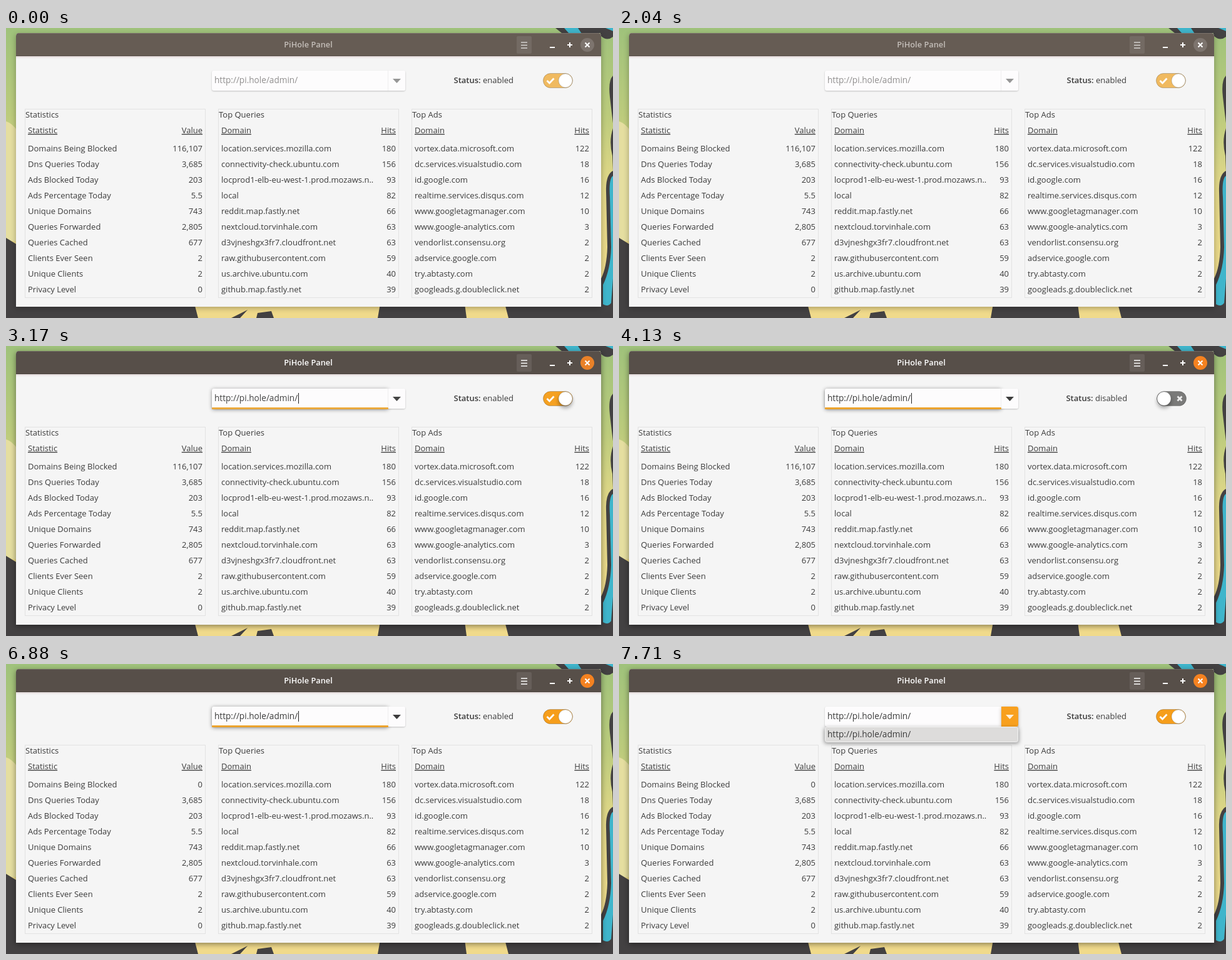
An HTML page for the animation above (8 s loop, 970 px wide and 463 px high).

```html
<!DOCTYPE html>
<html lang="en">
<head>
<meta charset="utf-8">
<title>PiHole Panel</title>
<style>
html, body { margin: 0; width: 100%; height: 100%; overflow: hidden; background: #434142; }
svg { display: block; width: 970px; height: 463px; }
text { font: 13px "Open Sans", "Noto Sans", sans-serif; fill: #3b3b3b; white-space: pre; }
.end { text-anchor: end; }
.mid { text-anchor: middle; }
.bold { font-weight: 600; }
.head { text-decoration: underline; }
.url { font-size: 13.6px; }
.frame { fill: none; stroke: #e2e2e2; }
.line { fill: none; stroke: #fff; stroke-width: 2; }
</style>
</head>
<body>
<svg viewBox="0 0 970 463">
  <defs>
    <linearGradient id="sky" x2="0" y2="1">
      <stop stop-color="#9fc27b"/><stop offset=".3" stop-color="#bccb7c"/>
      <stop offset=".55" stop-color="#e3d889"/><stop offset="1" stop-color="#f0da8b"/>
    </linearGradient>
    <linearGradient id="edge" x2="0" y2="1">
      <stop stop-color="#e2d8d8"/><stop offset="1" stop-color="#f5f5f5"/>
    </linearGradient>
    <filter id="blur" x="-20%" y="-50%" width="140%" height="200%"><feGaussianBlur stdDeviation="3"/></filter>
    <filter id="wide" x="-5%" y="-10%" width="110%" height="120%"><feGaussianBlur stdDeviation="5"/></filter>
    <filter id="soft" x="-10%" y="-30%" width="120%" height="160%"><feGaussianBlur stdDeviation="1.2"/></filter>
  </defs>

  <!-- wallpaper -->
  <rect width="970" height="463" fill="url(#sky)"/>
  <path d="M0 149Q10 152 18 164V340H0Z" fill="#e5dea0"/>
  <path d="M0 335L18 346V440H960V420H970V463H0Z" fill="#434142"/>
  <path d="M301 440H598L594 463H428L424 452 402 455 400 463H374L386 450 360 463H307ZM733 440H797L803 463H736Z" fill="#f0da8b"/>
  <path d="M878 0H970V14Q960 22 950 12V8H888Z" fill="#434142"/>
  <path d="M892 0H914L920 9H900ZM958 0H970V5Z" fill="#3fb5cb"/>
  <path d="M970 76Q962 84 965 110T970 152V160Q963 180 969 204L970 228Q958 234 959 262L961 350Q960 382 951 400V445H970Z" fill="#434142"/>
  <path d="M970 236Q963 240 965 270L967 350Q966 386 954 410V441Q962 446 967 439L970 400Z" fill="#3fb5cb"/>

  <!-- window -->
  <rect id="winShade" x="16" y="11" width="935" height="436" filter="url(#wide)"/>
  <path d="M16 445V13Q16 8 21 8H946Q951 8 951 13V445Z" fill="#f5f5f5"/>
  <path id="bar" d="M16 45V13Q16 8 21 8H946Q951 8 951 13V45Z"/>
  <path d="M20 8.5H947" stroke="#fff" stroke-opacity=".14"/>
  <path d="M16 44.5H951" stroke="#000" stroke-opacity=".14"/>
  <rect x="16" y="45" width="935" height="4" fill="url(#edge)"/>
  <text id="title" class="mid bold" x="483" y="31" style="font-size:12.8px">PiHole Panel</text>
  <rect x="816" y="13" width="24" height="28" rx="2" fill="#fff" fill-opacity=".09"/>
  <path id="menu" class="line" d="M823 23H833M823 27.5H833M823 32H833" style="stroke-width:1.6"/>
  <path class="line" d="M869 31H877M897 27H905M901 23V31"/>
  <circle id="close" cx="929" cy="27" r="11"/>
  <path class="line" d="M925.5 23.5L932.5 30.5M932.5 23.5L925.5 30.5"/>

  <!-- address box -->
  <rect x="329" y="69" width="309" height="32" rx="3" fill-opacity=".22" filter="url(#soft)"/>
  <rect id="entryShade" x="329" y="69" width="282" height="33" rx="3" filter="url(#blur)"/>
  <rect x="329" y="68" width="309" height="32" rx="3" fill="#fdfcfd"/>
  <path d="M610.5 68V100" stroke="#eee"/>
  <rect id="under" x="329" y="98" width="282" height="3" rx="1" fill="#eda32c"/>
  <rect id="dropShade" x="611" y="70" width="27" height="32" rx="3" filter="url(#blur)"/>
  <path d="M611 68H635Q638 68 638 71V97Q638 100 635 100H611Z" fill="#fdfcfd"/>
  <path id="drop" d="M611 68H635Q638 68 638 71V97Q638 100 635 100H611Z" fill="#f8a01e"/>
  <path id="arrow" d="M618 81H631L624.5 88Z"/>
  <text id="url" class="url" x="333" y="88">http://pi.hole/admin/</text>
  <path id="caret" d="M467.5 75V92" stroke="#222"/>

  <!-- status switch -->
  <text class="mid" x="763.3" y="88"><tspan class="bold">Status:</tspan> <tspan id="status"></tspan></text>
  <g id="switch">
    <rect id="track" x=".5" y="72.5" width="47" height="23" rx="11.5" stroke="#000" stroke-opacity=".22"/>
    <path class="line" d="M6.5 84L10.5 88 17.5 80.5" style="stroke-width:2.8"/>
    <path id="cross" class="line" d="M33.5 80.5L40.5 87.5M40.5 80.5L33.5 87.5" style="stroke-width:2.8;stroke:#eee"/>
    <g id="knob">
      <circle id="knobShade" cy="88" r="11" filter="url(#blur)"/>
      <circle cy="84" r="11" fill="#fff" stroke="#000" stroke-opacity=".2"/>
    </g>
  </g>

  <g id="tables"></g>

  <g id="popup">
    <rect x="328" y="102" width="311" height="25" rx="3" fill-opacity=".4" filter="url(#blur)"/>
    <rect x="329.5" y="100.5" width="308" height="24" rx="3" fill="#dddcdb" stroke="#f3f3f3"/>
    <text class="url" x="333" y="117">http://pi.hole/admin/</text>
  </g>
</svg>
<script>
const LOOP = 8000;
const $ = id => document.getElementById(id);

const tables = [
  ["Statistics", "Statistic", "Value", `Domains Being Blocked|116,107
Dns Queries Today|3,685
Ads Blocked Today|203
Ads Percentage Today|5.5
Unique Domains|743
Queries Forwarded|2,805
Queries Cached|677
Clients Ever Seen|2
Unique Clients|2
Privacy Level|0`],
  ["Top Queries", "Domain", "Hits", `location.services.mozilla.com|180
connectivity-check.ubuntu.com|156
locprod1-elb-eu-west-1.prod.mozaws.n..|93
local|82
reddit.map.fastly.net|66
nextcloud.torvinhale.com|63
d3vjneshgx3fr7.cloudfront.net|63
raw.githubusercontent.com|59
us.archive.ubuntu.com|40
github.map.fastly.net|39`],
  ["Top Ads", "Domain", "Hits", `vortex.data.microsoft.com|122
dc.services.visualstudio.com|18
id.google.com|16
realtime.services.disqus.com|12
www.googletagmanager.com|10
www.google-analytics.com|3
vendorlist.consensu.org|2
adservice.google.com|2
try.abtasty.com|2
googleads.g.doubleclick.net|2`]
];

const label = (x, y, s, cls = "") => `<text x="${x}" y="${y}" class="${cls}">${s}</text>`;

$("tables").innerHTML = tables.map(([name, left, right, rows], i) => {
  const x = 30 + i * 309;
  return `<rect class="frame" x="${x + .5}" y="129.5" width="288" height="301"/>` +
    label(x + 1, 143, name) + label(x + 5, 168, left, "head") + label(x + 284, 168, right, "head end") +
    rows.split("\n").map((row, j) => {
      const [key, value] = row.split("|"), y = 197 + j * 25;
      return label(x + 5, y, key) + label(x + 284, y, value, "end");
    }).join("");
}).join("");
const blocked = document.querySelectorAll("#tables .end")[1];

const ramp = (t, a, b) => Math.min(1, Math.max(0, (t - a) / (b - a)));
const easeOut = k => 1 - (1 - k) ** 3;
const mix = (a, b, k) => `rgb(${a.map((v, i) => Math.round(v + (b[i] - v) * k))})`;
const set = (id, name, value) => $(id).setAttribute(name, value);
const within = (t, a, b) => t >= a && t < b;

function draw(t) {
  const bar = ramp(t, 2900, 2955);
  const focus = ramp(t, 2905, 3200);
  const press = ramp(t, 7410, 7690);
  const hover = ramp(t, 2040, 2500) * (1 - ramp(t, 6580, 6860));
  const dropHover = ramp(t, 7000, 7330);
  const slide = 1 - easeOut(ramp(t, 3400, 3500)) + easeOut(ramp(t, 6006, 6106));
  const off = ramp(t, 3420, 3500) - ramp(t, 6070, 6200);
  const disabled = within(t, 3480, 6070);

  set("bar", "fill", mix([102, 92, 84], [87, 79, 73], bar));
  set("title", "style", `font-size:12.8px;fill:${mix([196, 190, 185], [255, 255, 255], bar)}`);
  set("winShade", "opacity", .3 + .15 * bar);
  set("menu", "stroke-opacity", .7 + .3 * focus);
  set("close", "fill", mix([125, 116, 110], [245, 130, 32], focus));

  set("url", "style", `fill:${mix([145, 143, 143], [59, 59, 59], focus)}`);
  set("under", "opacity", focus * (1 - press));
  set("entryShade", "opacity", .4 * focus * (1 - press));
  set("dropShade", "opacity", .22 * dropHover);
  set("drop", "opacity", press);
  set("arrow", "fill", press ? mix([60, 60, 60], [255, 240, 215], press)
                             : mix([150, 150, 150], [60, 60, 60], focus));
  const blink = within(t, 3710, 4130) || within(t, 5000, 5330) || within(t, 6200, 6580);
  set("caret", "opacity", +(within(t, 2940, 7420) && !blink));
  set("popup", "opacity", ramp(t, 7460, 7580));

  $("status").textContent = disabled ? "disabled" : "enabled";
  set("switch", "transform", `translate(${disabled ? 859 : 858})`);
  const on = [240, 186, 96].map((v, i) => v + ([246, 158, 27][i] - v) * focus);
  set("track", "fill", mix(on, [122, 122, 121], off));
  set("knob", "transform", `translate(${12 + 24 * slide})`);
  set("knobShade", "opacity", .35 * hover);
  blocked.textContent = t < 5000 ? "116,107" : "0";
}

function tick() {
  draw(performance.now() % LOOP);
  requestAnimationFrame(tick);
}
tick();
</script>
</body>
</html>
```
